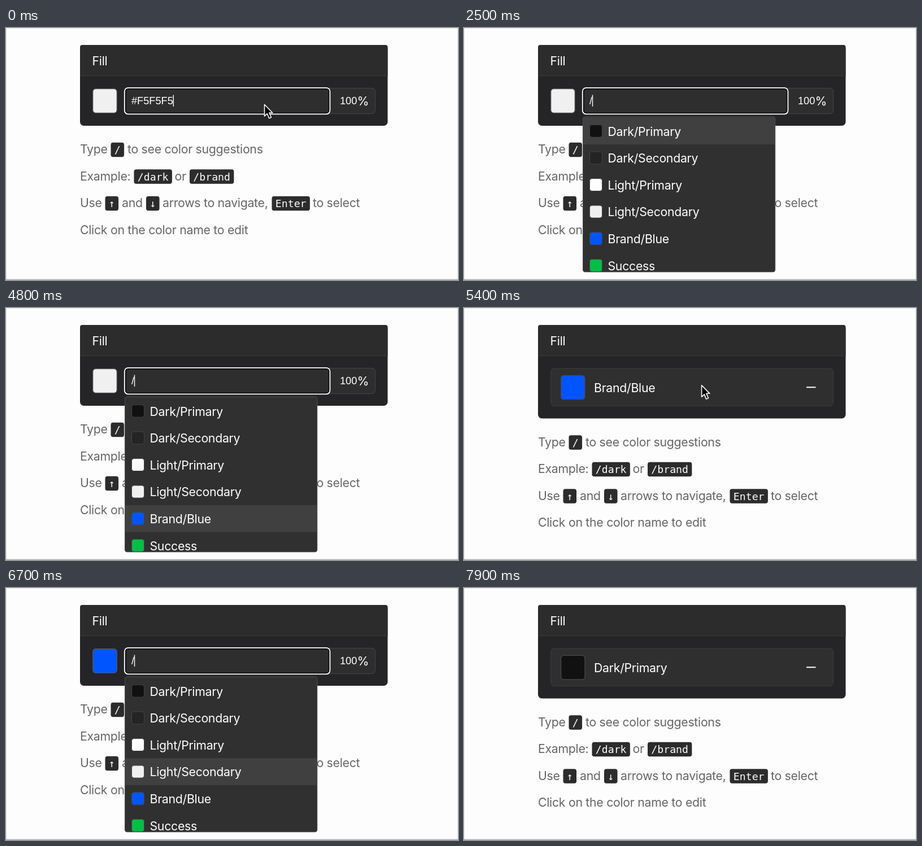
Recreate the animation shown at these times as an HTML page. Size 800 by 446 pixels, loop 8000 ms.

```html
<!DOCTYPE html>
<html lang="en">
<head>
<meta charset="utf-8">
<title>Fill color input</title>
<style>
  html, body { margin: 0; width: 100%; height: 100%; overflow: hidden; background: #fdfdfd; }
  svg { display: block; width: 800px; height: 446px; }
  text { white-space: pre; }
  .ui { font: 21.3px Inter, Roboto, sans-serif; letter-spacing: -.3px; }
  .field { font: 18.2px "Liberation Sans", Arial, sans-serif; }
  .code { font: 18.2px "DejaVu Sans Mono", "Liberation Mono", monospace; }
</style>
</head>
<body>
<svg id="stage" viewBox="0 0 800 446"></svg>
<script>
const LOOP = 8000;
const BLINK = 500;
const stage = document.getElementById('stage');

function add(parent, tag, attrs = {}, content) {
  const node = document.createElementNS('http://www.w3.org/2000/svg', tag);
  for (const key in attrs) node.setAttribute(key, attrs[key]);
  if (content !== undefined) node.textContent = content;
  parent.appendChild(node);
  return node;
}
const group = (parent, attrs) => add(parent, 'g', attrs);
const box = (parent, x, y, width, height, rx, fill, stroke = 'none', line = 1) =>
  add(parent, 'rect', { x, y, width, height, rx, fill, stroke, 'stroke-width': line });
const label = (parent, x, y, content, fill = '#fff', kind = 'ui') =>
  add(parent, 'text', { x, y, fill, class: kind }, content);
const show = (node, on) => node.setAttribute('display', on ? 'inline' : 'none');

const COLORS = [
  ['Dark/Primary', '#111111'],
  ['Dark/Secondary', '#242424'],
  ['Light/Primary', '#ffffff'],
  ['Light/Secondary', '#f0f0f0'],
  ['Brand/Blue', '#0055ff'],
  ['Success', '#00be46']
];
const ROW = 47.6;

// Window edges
box(stage, 0, 0, 800, 446, 0, '#fdfdfd');
box(stage, 0, 0, 800, 1, 0, '#e6e6e6');
box(stage, 0, 0, 1, 446, 0, '#e6e6e6');
box(stage, 799, 0, 1, 446, 0, '#e6e6e6');
box(stage, 0, 444.6, 800, 1.4, 0, '#ababab');

// Help text
const notes = group(stage);
function noteLine(row, parts) {
  const y = 222 + row * 47.5;
  for (const [x, content, key] of parts) {
    if (key) {
      box(notes, x, y - 19.3, content.length * 10.96 + 12.6, 25.6, 4, '#2c2c2c');
      label(notes, x + 6.3, y, content, '#fff', 'code');
    } else {
      label(notes, x, y, content, '#666');
    }
  }
}
noteLine(0, [[131, 'Type'], [185.5, '/', true], [215, 'to see color suggestions']]);
noteLine(1, [[131, 'Example:'], [226.5, '/dark', true], [298.5, 'or'], [325, '/brand', true]]);
noteLine(2, [[131, 'Use'], [175.5, '↑', true], [205, 'and'], [248, '↓', true],
  [277, 'arrows to navigate,'], [470.5, 'Enter', true], [543, 'to select']]);
noteLine(3, [[131, 'Click on the color name to edit']]);

// Panel
const panel = box(stage, 131, 30, 544.5, 143, 7, '#252426');
add(stage, 'path', { d: 'M131 85V34a4 4 0 0 1 4-4H671.500a4 4 0 0 1 4 4V85Z', fill: '#2c2c2c' });
box(stage, 131, 84, 544.5, 1.2, 0, '#38393a');
label(stage, 152.5, 66, 'Fill');

// Editing view
const editor = group(stage);
const swatch = box(editor, 153.7, 107.7, 42.6, 42.6, 5, '#f0f0f0', '#555', 1.3);
box(editor, 209.500, 106.700, 444, 45, 6, '#2e2e2e', '#414141', 1.2);
box(editor, 211.5, 107.5, 360.5, 43.5, 5, '#2e2e2e', '#0c0c0c', 2.4);
box(editor, 209.8, 105.8, 363.6, 46.6, 6.5, 'none', '#fff', 1.8);
const mark = box(editor, 222, 118, 75, 23, 0, '#566a80');
const hint = label(editor, 222, 135, 'Type / for colors', '#757575', 'field');
const value = label(editor, 222, 135, '', '#fff', 'field');
const caret = box(editor, 222, 118.5, 1.4, 20.5, 0, '#fff');
label(editor, 591, 135, '100', '#fff', 'field');
label(editor, 621.500, 137, '%');

// Chosen color view
const chip = group(stage);
box(chip, 153.6, 106.8, 500, 66.6, 7, '#2f2f2f', '#3b3b3b', 1.2);
const chipSwatch = box(chip, 171.6, 119.4, 42.4, 42.4, 5, '#111', '#484848', 1.3);
const chipName = label(chip, 230, 148.5, '');
box(chip, 606, 139.300, 16.5, 2, 0, '#fff');

// Suggestions
const clip = add(add(stage, 'defs'), 'clipPath', { id: 'menu-clip' });
box(clip, 211, 157.5, 339.5, 274, 4, '#fff');
const menu = group(stage);
box(menu, 210.6, 157.1, 340, 274.6, 4, '#303030');
const rows = group(menu, { 'clip-path': 'url(#menu-clip)' });
const cursorRow = box(rows, 211, 0, 340, ROW, 0, '#404040');
COLORS.forEach(([name, color], i) => {
  const y = i * ROW;
  box(rows, 222.5, 171.3 + y, 22, 22, 4, color, '#444', 1);
  label(rows, 254.5, 190.5 + y, name);
});
box(menu, 210.6, 157.1, 340, 274.6, 4, 'none', '#4a4a4a', 1.2);

const pointer = add(stage, 'path', {
  d: 'M0 0V20.500L4.700 16L8.200 24.300L11.900 22.700L8.400 14.500H14.300Z',
  fill: '#000', stroke: '#fff', 'stroke-width': 1.6, 'stroke-linejoin': 'round'
});

// Each step changes part of the state from its time on; a beat restarts the caret.
const STEPS = [
  [0, { text: '#F5F5F5', fill: '#f0f0f0', row: -1, picked: -1, marked: false, beat: -400 }],
  [800, { marked: true }],
  [1200, { text: '', marked: false, beat: 1200 }],
  [2100, { text: '/', row: 0, beat: 2100 }],
  [3200, { row: 1, beat: 3200 }],
  [3700, { row: 2, beat: 3700 }],
  [4000, { row: 3, beat: 4000 }],
  [4400, { row: 4, beat: 4400 }],
  [5000, { picked: 4, fill: COLORS[4][1] }],
  [5700, { picked: -1, beat: 5700 }],
  [6500, { row: 3, beat: 6500 }],
  [7000, { row: 2, beat: 7000 }],
  [7300, { row: 1, beat: 7300 }],
  [7500, { row: 0, beat: 7500 }],
  [7700, { picked: 0 }]
];
const CARET_X = { '#F5F5F5': 295.6, '/': 226.8, '': 222.3 };

const ease = p => p * p * (3 - 2 * p);
function pointerAt(t) {
  if (t < 1200) return [457.5, 135.5];
  if (t < 5300 || t >= 6400) return null;
  const p = ease(Math.min(1, (t - 5300) / 300));
  return [457.5 - 140 * p, 135.5 + 5 * p];
}

function draw(t) {
  const s = {};
  for (const [at, change] of STEPS) if (t >= at) Object.assign(s, change);
  const done = s.picked >= 0;

  panel.setAttribute('height', done ? 165.5 : 143);
  notes.setAttribute('transform', `translate(0 ${done ? 22.5 : 0})`);
  show(editor, !done);
  show(chip, done);
  show(menu, !done && s.row >= 0);

  swatch.setAttribute('fill', s.fill);
  value.textContent = s.text;
  show(hint, !s.text);
  show(mark, s.marked);
  caret.setAttribute('x', CARET_X[s.text]);
  show(caret, !s.marked && Math.floor((t - s.beat) / BLINK) % 2 === 0);
  cursorRow.setAttribute('y', 158.5 + s.row * ROW);

  if (done) {
    const [name, color] = COLORS[s.picked];
    chipName.textContent = name;
    chipSwatch.setAttribute('fill', color);
  }

  const spot = pointerAt(t);
  show(pointer, spot);
  if (spot) pointer.setAttribute('transform', `translate(${spot})`);
}

const start = performance.now();
function tick() {
  draw((performance.now() - start) % LOOP);
  requestAnimationFrame(tick);
}
tick();
</script>
</body>
</html>
```
